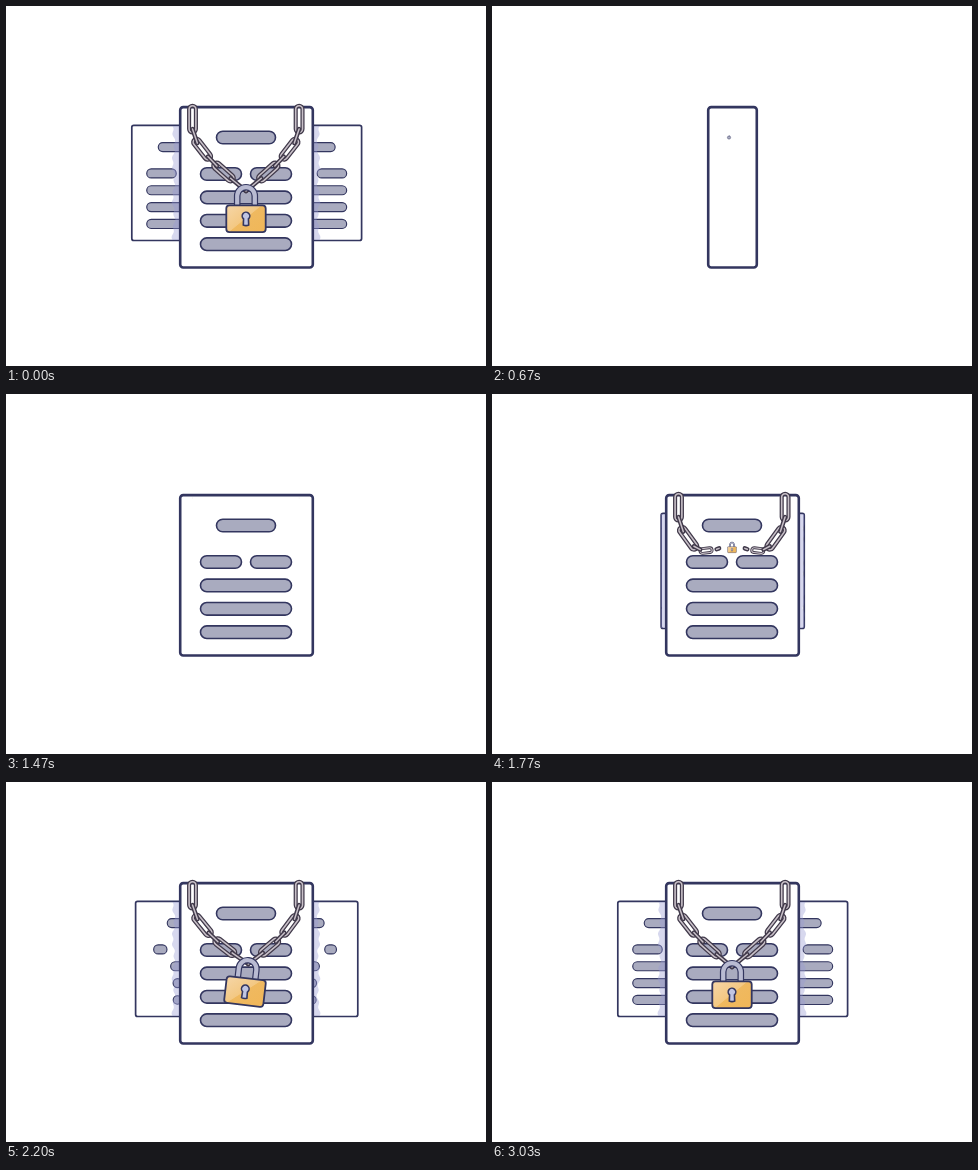
Write an HTML page with a canvas that moves like this. It is 480 px wide and 360 px high and loops after 3530 ms.

```html
<!DOCTYPE html>
<html lang="en">
<head>
<meta charset="utf-8">
<title>Locked documents</title>
<style>
html, body { margin: 0; width: 100%; height: 100%; overflow: hidden; background: #fff; }
canvas { display: block; width: 480px; height: 360px; }
</style>
</head>
<body>
<canvas id="stage" width="480" height="360"></canvas>
<script>
const LOOP = 3530, END = 3030;
const INK = '#33365f', BAR = '#a9abbf', CHAIN = '#40394a', STEEL = '#c8c0c8';
const MID = 240, SIDE = 0.72;
const c = document.getElementById('stage').getContext('2d');

const clamp = v => Math.max(0, Math.min(1, v));
const ramp = (t, start, dur) => clamp((t - start) / dur);
const ease = x => (1 - Math.cos(Math.PI * x)) / 2;
const glide = (t, start, dur) => ease(ramp(t, start, dur));
const mix = (a, b, p) => a + (b - a) * p;
const between = (a, b, p) => [mix(a[0], b[0], p), mix(a[1], b[1], p)];

function box(x, y, w, h, r, fill, width) {
  c.beginPath();
  c.roundRect(x, y, w, h, Math.min(r, w / 2, h / 2));
  c.fillStyle = fill;
  c.fill();
  c.strokeStyle = INK;
  c.lineWidth = width;
  c.stroke();
}

// A bar pops up as a dot, then stretches to its width.
function bar(x, y, w, age) {
  if (age <= 0) return;
  const pop = ramp(age, 0, 100);
  const p = glide(age, 0, 600);
  const h = 12.6 * pop;
  const bw = Math.max(p * w, h);
  box(x - 3 * (1 - p) - bw / 2, y - h / 2, bw, h, h / 2, BAR, 1.6 * pop);
}

function bars(age) {
  const rowY = row => 168 + 23.4 * row;
  bar(MID, 131.5, 59, age);
  for (const half of [0, 1]) bar(MID + 25 * (half * 2 - 1), rowY(0), 41, age - 30 - 20 * half);
  for (let row = 1; row <= 3; row++) bar(MID, rowY(row), 91, age - 79 - 46 * row);
}

function frontSheet(t) {
  const tall = ramp(t, 85, 360);
  if (!tall) return;
  const h = Math.max(3, 160.4 * ease(tall));
  const w = Math.max(3, 132.6 * glide(t, 373, 720));
  box(240.5 - w / 2, 181.3 - h / 2, w, h, 3, '#fff', 2.6);
  bars(t - 645);
}

// Soft wavy shadow that the front sheet casts on the sheets behind.
function shade(dir) {
  const edge = MID + dir * 66;
  c.beginPath();
  c.moveTo(edge, 120);
  for (let y = 120; y <= 234; y += 2) {
    c.lineTo(edge + dir * (6.5 + Math.sin(y * 0.55) + Math.sin(y * 0.17)), y);
  }
  c.lineTo(edge, 234);
  c.fillStyle = 'rgba(150,154,210,.38)';
  c.fill();
}

function sideSheet(t, dir) {
  if (t < 1613) return;
  const center = MID + 0.7 + dir * 67.2;
  const x = center - 47.7, w = 95.4, y = 119.3;
  const left = x - dir * 49 * (1 - glide(t, 1613, 717));
  box(left, y, w, 115.2, 2, '#fff', 1.7);
  c.save();
  c.translate(center - MID * SIDE, y - 101.2 * SIDE);
  c.scale(SIDE, SIDE);
  bars(t - 1890);
  c.restore();
  c.save();
  c.beginPath();
  c.rect(left, y, w, 115);
  c.clip();
  shade(dir);
  c.restore();
}

function twoTone(dark, light) {
  c.lineCap = 'round';
  c.strokeStyle = CHAIN;
  c.lineWidth = dark;
  c.stroke();
  c.strokeStyle = STEEL;
  c.lineWidth = light;
  c.stroke();
}

// Chain link seen from the front, growing out of point a.
function ring(a, b, inset, s) {
  if (s <= 0) return;
  const dx = b[0] - a[0], dy = b[1] - a[1];
  c.save();
  c.translate(a[0], a[1]);
  c.rotate(Math.atan2(dy, dx));
  c.scale(s, s);
  c.beginPath();
  c.roundRect(inset, -3.4, Math.hypot(dx, dy) - 2 * inset, 6.8, 3.4);
  twoTone(4.1, 1.6);
  c.restore();
}

// Chain link seen from its edge.
function bridge(a, b, s) {
  if (s <= 0) return;
  c.beginPath();
  c.moveTo(...a);
  c.lineTo(...between(a, b, s));
  twoTone(4.4, 1.5);
}

// The higher the lock hangs, the more slack there is in the chain.
function strand(t, x, lockAt) {
  const pop = n => glide(t, 1455 + n * 85, 230);
  const top = [x, mix(104, 99.8, pop(0))];
  const a = [x, 131];
  const sag = 5 + (185 - lockAt[1]) * 0.42;
  const joint = (p, k) => {
    const [jx, jy] = between(a, lockAt, p);
    return [jx, jy + sag * k];
  };
  const b = joint(0.36, 1), d = joint(0.8, 0.45);
  ring(top, [x, 126.5], 0, pop(0));
  ring(a, b, 3.2, pop(1));
  bridge([x, 123], between(a, b, 0.25), pop(1));
  ring(b, d, 3.2, pop(2));
  bridge(between(a, b, 0.8), between(b, d, 0.22), pop(2));
  bridge(between(b, d, 0.8), lockAt, pop(3));
}

function lock(t, at, angle) {
  const s = 0.88 * glide(t, 1680, 270) + 0.12 * glide(t, 1960, 200);
  if (s <= 0) return;
  c.save();
  c.translate(...at);
  c.rotate(angle * Math.PI / 180);
  c.scale(s, s);
  c.translate(0, -8);

  c.beginPath();
  c.moveTo(-8.8, 23);
  c.arc(0, 13, 8.8, Math.PI, 0);
  c.lineTo(8.8, 23);
  c.lineCap = 'butt';
  for (const [color, width] of [[INK, 6.6], ['#b9bbd2', 4.2]]) {
    c.strokeStyle = color;
    c.lineWidth = width;
    c.stroke();
  }

  const tone = c.createLinearGradient(-12, 22, 10, 49);
  ['#f5d3a0', '#f3c883', '#efb960', '#f0b75a'].forEach((color, i) => {
    tone.addColorStop([0, 0.5, 0.52, 1][i], color);
  });
  box(-19.7, 22.3, 39.4, 26.8, 3.2, tone, 1.8);

  c.beginPath();
  c.arc(0, 33, 3.8, Math.PI * 0.72, Math.PI * 0.28);
  c.lineTo(2.7, 42);
  c.quadraticCurveTo(0, 43.3, -2.7, 42);
  c.closePath();
  c.fillStyle = '#c0c5e2';
  c.fill();
  c.lineWidth = 1.6;
  c.stroke();
  c.restore();
}

function hangingLock(t) {
  const u = ramp(t, 1970, END - 1970);
  const angle = 48 * u * (1 - u) * Math.sin(3.2 * Math.PI * u);
  const drop = 12 * glide(t, 1500, 470) + 31 * glide(t, 1970, 260);
  const at = [MID + angle * 0.33, 142 + drop - Math.abs(angle) * 0.3];
  for (const dir of [-1, 1]) strand(t, MID - 0.2 + dir * 53.3, at);
  lock(t, at, angle);
}

function draw(t) {
  c.fillStyle = '#fff';
  c.fillRect(0, 0, 480, 360);
  for (const dir of [-1, 1]) sideSheet(t, dir);
  frontSheet(t);
  hangingLock(t);
}

function tick() {
  const t = performance.now() % LOOP;
  // The loop opens with one short flash of the finished picture.
  draw(t < 30 ? END : Math.min(t, END));
  requestAnimationFrame(tick);
}
tick();
</script>
</body>
</html>
```
